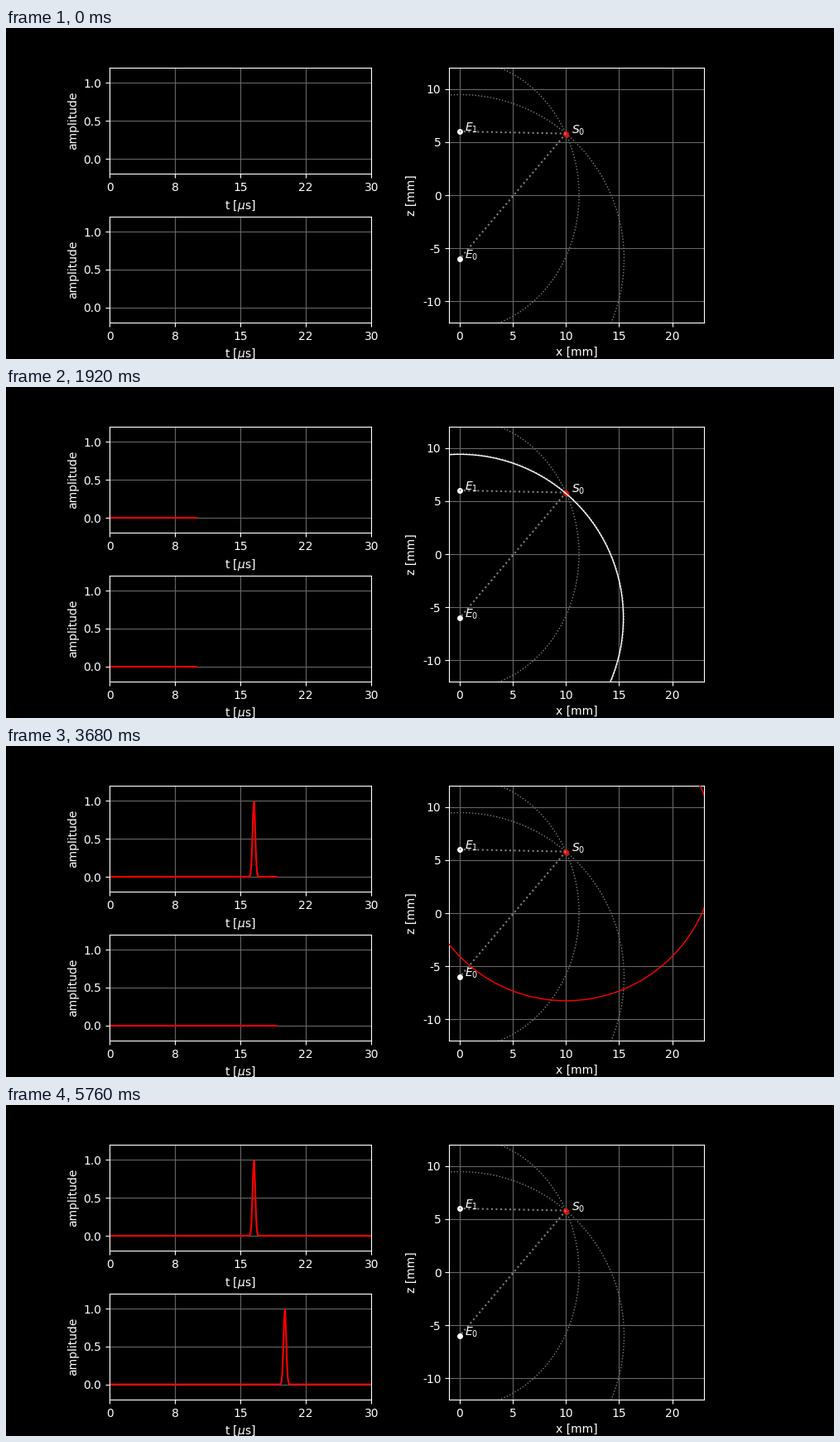
These frames come from a looping animation (1000 by 400 pixels, 8000 ms). A matplotlib script:

```python
import numpy as np
import matplotlib.pyplot as plt
from matplotlib.animation import FuncAnimation
from matplotlib.patches import Circle, Ellipse

plt.style.use("dark_background")
plt.rcParams.update({
    "font.family": "DejaVu Sans",
    "axes.unicode_minus": False,
    "grid.color": "0.4",
})

SPEED = 1.54                 # mm per microsecond
T_END = 30.0
SWEEP, FRAMES = 144, 200     # frames in motion, frames per loop
SIGMA = 0.15

E0 = np.array([0.0, -6.0])
E1 = np.array([0.0, 6.0])
S0 = np.array([10.0, 5.8])
d0 = np.hypot(*(S0 - E0))
d1 = np.hypot(*(S0 - E1))

times = np.linspace(0, T_END, 2 * SWEEP + 1)


def echo(path):
    return np.exp(-0.5 * ((times - path / SPEED) / SIGMA) ** 2)


fig = plt.figure(figsize=(10, 4), dpi=100)
grid = fig.add_gridspec(2, 2, left=0.125, right=0.9, bottom=0.11, top=0.88,
                        width_ratios=[3, 4], wspace=0.1, hspace=0.4)


def signal_axes(row):
    ax = fig.add_subplot(grid[row, 0])
    ax.set(xlim=(0, T_END), ylim=(-0.2, 1.2),
           xlabel=r"t [$\mu$s]", ylabel="amplitude")
    ax.set_xticks(np.linspace(0, T_END, 5))
    ax.xaxis.set_major_formatter("{x:.0f}")
    ax.set_yticks([0, 0.5, 1])
    ax.grid(True)
    return ax.plot([], [], color="red", lw=1.5)[0]


traces = [(signal_axes(0), echo(d0 + d1)), (signal_axes(1), echo(2 * d0))]

ax = fig.add_subplot(grid[:, 1])
ax.set_aspect("equal")
ax.set(xlim=(-1, 23), ylim=(-12, 12), xlabel="x [mm]", ylabel="z [mm]")
ax.set_xticks(range(0, 21, 5))
ax.set_yticks(range(-10, 11, 5))
ax.grid(True)

# Points of equal travel time for each receiver
dotted = dict(fill=False, ec="gray", ls=":", lw=1)
total = d0 + d1
ax.add_patch(Circle(E0, d0, **dotted))
ax.add_patch(Ellipse((0, 0), 2 * np.sqrt((total / 2) ** 2 - E1[1] ** 2),
                     total, **dotted))

for name, point, color in (("E_0", E0, "white"), ("E_1", E1, "white"),
                           ("S_0", S0, "red")):
    ax.plot(*point, "o", ms=4, color=color)
    ax.text(point[0] + 0.5, point[1], f"${name}$")
for point in (E0, E1):
    ax.plot(*zip(S0, point), ":", color="gray", lw=1.5)


def wave(center, color):
    return ax.add_patch(Circle(center, 0, fill=False, ec=color, lw=1,
                               zorder=3, visible=False))


sent = wave(E0, "white")
scattered = wave(S0, "red")


def set_radius(circle, radius):
    circle.set_visible(radius > 0)
    circle.set_radius(max(radius, 0))


def update(frame):
    step = min(frame, SWEEP)
    count = 2 * step + 1 if step else 0
    for line, values in traces:
        line.set_data(times[:count], values[:count])
    reach = SPEED * T_END * step / SWEEP
    set_radius(sent, reach)
    set_radius(scattered, reach - d0)
    return [line for line, _ in traces] + [sent, scattered]


anim = FuncAnimation(fig, update, frames=FRAMES, interval=40,
                     repeat=True, repeat_delay=0)
plt.show()
```
